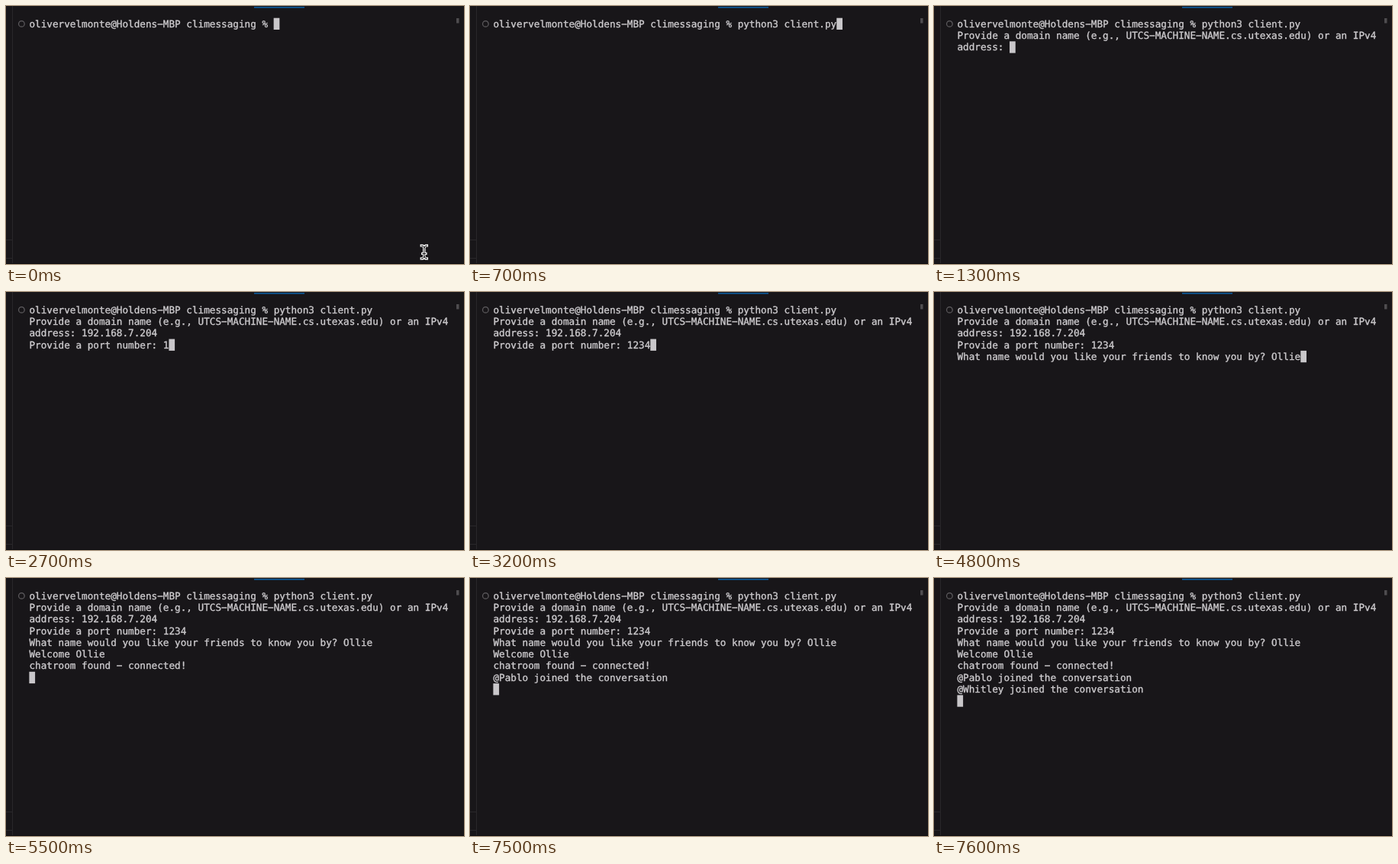
An HTML page with a canvas for the animation above (8 s loop, 600x338 px).

```html
<!DOCTYPE html>
<html lang="en">
<head>
<meta charset="utf-8">
<title>Terminal chat client</title>
<style>
html, body { margin: 0; width: 100%; height: 100%; overflow: hidden; background: #181619; }
canvas { display: block; width: 600px; height: 338px; }
</style>
</head>
<body>
<canvas id="stage" width="600" height="338"></canvas>
<script>
const ctx = document.getElementById('stage').getContext('2d');
const LOOP = 8000;
const LEFT = 30.4, TOP = 16, CELL = 7.625, LINE = 15.3, BASELINE = 11.6;
const FONT_SIZE = CELL / 0.602;

// Terminal output as [time, text]; each entry is appended to the screen.
const output = [
  [0, 'olivervelmonte@Holdens-MBP climessaging % '],
  [700, 'python3 client.py'],
  [1200, '\n'],
  [1300, 'Provide a domain name (e.g., UTCS-MACHINE-NAME.cs.utexas.edu) or an IPv4\naddress: '],
  [2000, '192.168.7.204'],
  [2200, '\nProvide a port number: '],
  [2700, '1'],
  [2900, '2'],
  [3000, '3'],
  [3200, '4'],
  [3400, '\nWhat name would you like your friends to know you by? '],
  [4100, 'O'],
  [4400, 'll'],
  [4500, 'i'],
  [4800, 'e'],
  [5000, '\nWelcome Ollie\n'],
  [5100, 'chatroom found - connected!\n'],
  [7500, '@Pablo joined the conversation\n'],
  [7600, '@Whitley joined the conversation\n']
];

function rect(color, x, y, w, h) {
  ctx.fillStyle = color;
  ctx.fillRect(x, y, w, h);
}

function drawWindow() {
  rect('#181619', 0, 0, 600, 338);
  rect('#29272a', 8, 0, 1, 338);
  rect('#29272a', 0, 306, 8, 1);
  rect('#29272a', 0, 330, 8, 1);
  rect('#0f0e10', 0, 337, 600, 1);
  rect('#0d5c9e', 325, 1, 66, 1.6);
  rect('#4e4c4f', 590, 16, 3.5, 6.5);
  ctx.strokeStyle = '#605e61';
  ctx.lineWidth = 1.2;
  ctx.beginPath();
  ctx.arc(20.4, 23.4, 3.8, 0, Math.PI * 2);
  ctx.stroke();
}

function drawTerminal(time) {
  const lines = output.filter(([at]) => at <= time).map(([, text]) => text).join('').split('\n');
  const last = lines.length - 1;

  // Drawing scaled down keeps the fractional glyph advances.
  ctx.save();
  ctx.scale(0.5, 0.5);
  ctx.font = `${FONT_SIZE * 2}px "DejaVu Sans Mono", monospace`;
  ctx.textRendering = 'geometricPrecision';
  ctx.fillStyle = ctx.strokeStyle = '#cdcbce';
  ctx.lineWidth = 0.7;
  ctx.lineJoin = 'round';
  lines.forEach((line, row) => {
    const wideHyphens = line.replaceAll('-', '\u2212');
    const y = (TOP + row * LINE + BASELINE) * 2;
    ctx.fillText(wideHyphens, LEFT * 2, y);
    ctx.strokeText(wideHyphens, LEFT * 2, y);
  });
  ctx.restore();

  rect('#c9c7ca', LEFT + lines[last].length * CELL, TOP + last * LINE - 0.3, 7.7, 15.3);
}

function drawPointer(x, y) {
  const beam = new Path2D(`M${x - 3.5} ${y - 8.5}Q${x} ${y - 8.5} ${x} ${y - 5.5}
    V${y + 5.5}Q${x} ${y + 8.5} ${x - 3.5} ${y + 8.5}
    M${x + 3.5} ${y - 8.5}Q${x} ${y - 8.5} ${x} ${y - 5.5}
    M${x + 3.5} ${y + 8.5}Q${x} ${y + 8.5} ${x} ${y + 5.5}
    M${x - 2} ${y + 2}H${x + 2}`);
  ctx.lineCap = 'square';
  for (const [color, width] of [['#ffffff', 3.4], ['#111012', 1]]) {
    ctx.strokeStyle = color;
    ctx.lineWidth = width;
    ctx.stroke(beam);
  }
}

function frame(now) {
  const time = now % LOOP;
  drawWindow();
  drawTerminal(time);
  if (time < 100) drawPointer(547.8, 322.4);
  requestAnimationFrame(frame);
}

requestAnimationFrame(frame);
</script>
</body>
</html>
```
